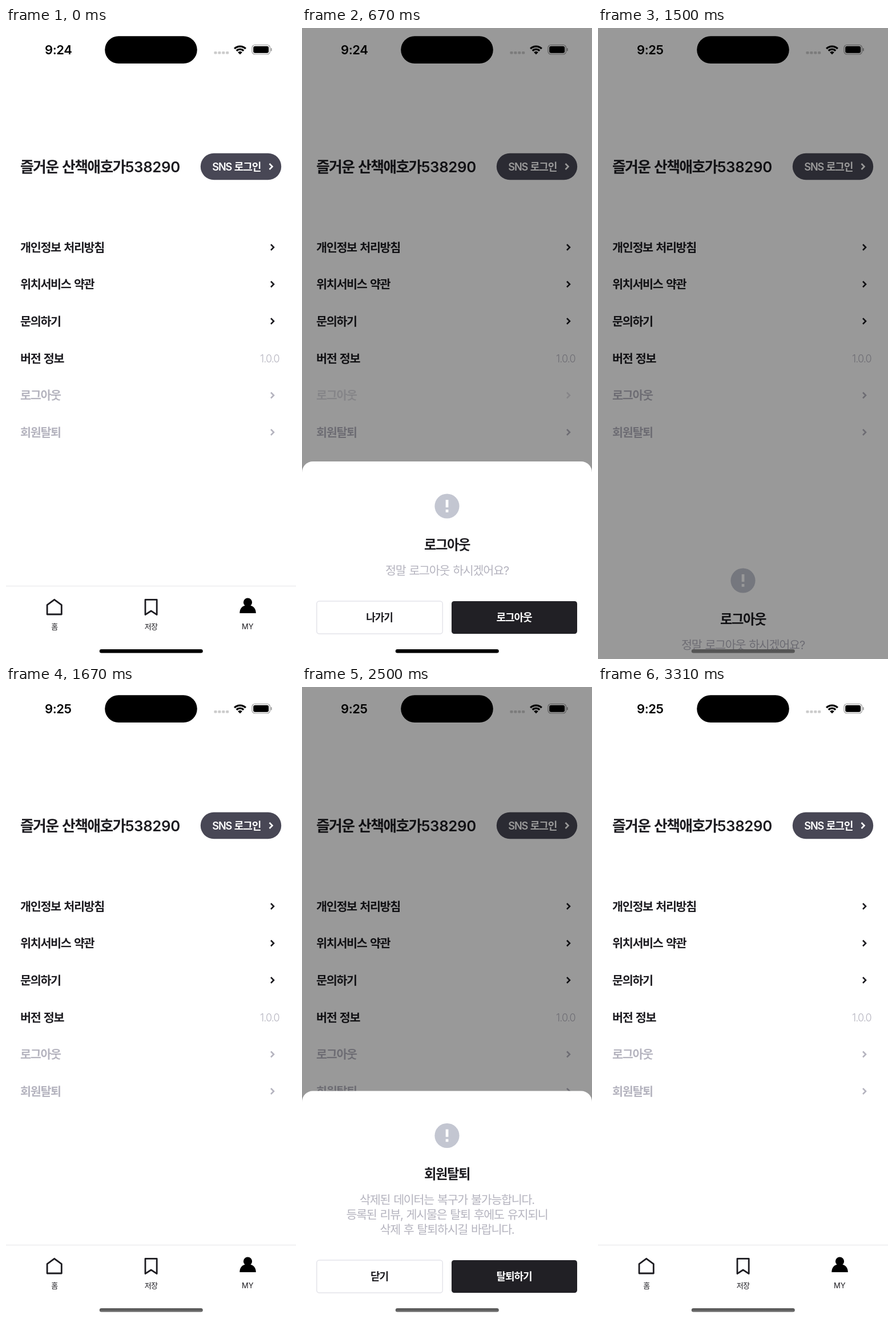
An HTML page for the animation above (3.61 s loop, 508x1102 px).

```html
<!DOCTYPE html>
<html lang="ko">
<head>
<meta charset="utf-8">
<title>MY</title>
<style>
  html, body { margin: 0; height: 100%; overflow: hidden; background: #fff; }
  svg { display: block; width: 100%; height: 100%; }
  text {
    font-family: Inter, 'Noto Sans CJK KR', 'Noto Sans CJK', sans-serif;
    letter-spacing: -.064em;
    word-spacing: .07em;
    white-space: pre;
  }
  .line { fill: none; stroke: #1d1c21; stroke-width: 2.8; stroke-linejoin: round; }
</style>
</head>
<body>
<svg id="stage" viewBox="0 0 508 1102"></svg>
<script>
const LOOP = 3610;
const INK = '#1d1c21', MUTED = '#b5b4bf';

// y is the vertical centre of the line
const text = (x, y, size, str, { fill = INK, weight = 600, anchor = 'start', extra = '' } = {}) =>
  `<text x="${x}" y="${y + size * .37}" font-size="${size}" font-weight="${weight}"
    fill="${fill}" text-anchor="${anchor}" ${extra}>${str}</text>`;

const rect = (x, y, w, h, r, fill, extra = '') =>
  `<rect x="${x}" y="${y}" width="${w}" height="${h}" rx="${r}" fill="${fill}" ${extra}/>`;

const chevron = (x, y, color) =>
  `<path d="M${x} ${y - 5}l5 5l-5 5" fill="none" stroke="${color}" stroke-width="2.6"/>`;

const wifiArc = r => {
  const d = r * Math.SQRT1_2;
  return `<path d="M${410 - d} ${46 - d}A${r} ${r} 0 0 1 ${410 + d} ${46 - d}"
    fill="none" stroke="#000" stroke-width="3.3"/>`;
};

const row = (y, label, color = INK, id = '') =>
  `<g id="${id}">${text(25, y, 20.7, label, { fill: color })}${chevron(464, y, color)}</g>`;

const tab = (x, label, extra = '') =>
  text(x, 1045, 13, label, { weight: 400, anchor: 'middle', extra });

const statusBar = `
  <text id="clock" x="68" y="46" font-size="22" font-weight="600" style="letter-spacing:-.02em"></text>
  ${rect(173.2, 14.2, 161.6, 47.8, 23.9, '#000')}
  ${[0, 1, 2, 3].map(i => rect(364.5 + i * 6.9, 41, 5, 4.6, 1.3, '#ccc')).join('')}
  ${wifiArc(13.9)}${wifiArc(8.8)}
  <path d="M410 46.2l-3.8-3.8a5.3 5.3 0 0 1 7.6 0z"/>
  ${rect(431, 29.5, 31.5, 16.5, 5, 'none', 'stroke="#999" stroke-width="1.2"')}
  ${rect(433.2, 31.7, 27, 12.1, 3.2, '#000')}
  ${rect(463.8, 35, 1.9, 5.4, 1, '#999')}`;

const page = `
  ${text(25, 242, 25.85, '즐거운 산책애호가<tspan style="letter-spacing:-.015em">538290</tspan>')}
  ${rect(340.8, 218.7, 141.4, 46.5, 23.25, '#484755')}
  ${text(361.3, 242, 18.1, 'SNS 로그인', { fill: '#fff' })}
  ${chevron(461.5, 242, '#fff')}
  ${row(383, '개인정보 처리방침')}
  ${row(447.5, '위치서비스 약관')}
  ${row(512, '문의하기')}
  ${text(25, 577, 20.7, '버전 정보')}
  ${text(445, 577, 18.1, '1.0.0', { fill: MUTED, weight: 300, extra: 'style="letter-spacing:-.05em"' })}
  ${row(641.5, '로그아웃', MUTED, 'logoutRow')}
  ${row(706, '회원탈퇴', MUTED, 'leaveRow')}
  ${rect(0, 974, 508, 1.2, 0, '#e9e9ec')}
  <path class="line" d="M84.7 998.3L97.3 1007.6V1024H72.1V1007.6Z"/>
  <path class="line" d="M244 998.4H264.2V1024.6L254.1 1018L244 1024.6Z"/>
  <circle cx="423.5" cy="1003" r="7.6"/>
  <path d="M409.3 1022C409.3 1013 414.8 1008 423.5 1008S437.8 1013 437.8 1022Z"/>
  ${tab(84.7, '홈')}${tab(254, '저장')}${tab(423.3, 'MY', 'style="letter-spacing:0"')}`;

const sheet = (id, top, title, lines, cancel, confirm) => {
  const mid = { anchor: 'middle' };
  return `<g id="${id}">
    ${rect(0, top, 508, 1130 - top, 19, '#fff')}
    <circle cx="254" cy="${top + 78}" r="21.6" fill="#c3c6d1"/>
    ${rect(251.7, top + 67, 4.7, 13.2, 0, '#fff')}
    ${rect(251.7, top + 84, 4.7, 4.8, 0, '#fff')}
    ${text(254, top + 145, 23.3, title, mid)}
    ${lines.map((s, i) => text(254, top + 190 + i * 26, 20.7, s,
      { fill: MUTED, weight: 400, anchor: 'middle' })).join('')}
    ${rect(25.8, 1001, 220.5, 57, 4.5, '#fff', 'stroke="#e4e4ea" stroke-width="1.5"')}
    ${text(135.5, 1029.5, 18.1, cancel, mid)}
    ${rect(262, 1001, 220, 57, 4.5, '#212025')}
    ${text(371.5, 1029.5, 18.1, confirm, { fill: '#fff', anchor: 'middle' })}
  </g>`;
};

const shade = id => rect(0, 0, 508, 1102, 0, '#000', `id="${id}" opacity=".4"`);

const $ = id => document.getElementById(id);

$('stage').innerHTML = `
  <linearGradient id="grey" x2="0" y2="1">
    <stop stop-color="#505050"/><stop offset="1" stop-color="#747474"/>
  </linearGradient>
  ${rect(0, 0, 508, 1102, 0, '#fff')}
  ${statusBar}${page}
  ${shade('under')}
  ${sheet('logoutSheet', 757, '로그아웃', ['정말 로그아웃 하시겠어요?'], '나가기', '로그아웃')}
  ${sheet('leaveSheet', 705.5, '회원탈퇴',
    ['삭제된 데이터는 복구가 불가능합니다.', '등록된 리뷰, 게시물은 탈퇴 후에도 유지되니', '삭제 후 탈퇴하시길 바랍니다.'],
    '닫기', '탈퇴하기')}
  ${shade('over')}
  ${rect(163.8, 1085, 181, 6.6, 3.3, '#000', 'id="homeBar"')}`;

const show = (id, on) => $(id).setAttribute('visibility', on ? 'visible' : 'hidden');

function draw(now) {
  const t = now % LOOP;
  const within = (a, b) => t >= a && t < b;

  $('clock').textContent = t < 1170 ? '9:24' : '9:25';
  $('logoutRow').setAttribute('opacity', within(670, 830) ? .45 : 1);
  $('leaveRow').setAttribute('opacity', within(2170, 2330) ? .3 : 1);

  show('logoutSheet', within(670, 1670));
  show('leaveSheet', within(2170, 3310));
  $('logoutSheet').setAttribute('transform', `translate(0 ${t >= 1500 ? 130 : 0})`);

  // a closing sheet falls under the shade
  const closing = within(1330, 1670) || within(3000, 3310);
  show('under', within(670, 1330) || within(2170, 3000));
  show('over', closing);

  $('homeBar').setAttribute('fill', t < 1330 ? '#000' : closing ? '#555' : 'url(#grey)');
  requestAnimationFrame(draw);
}
draw(performance.now());
</script>
</body>
</html>
```
